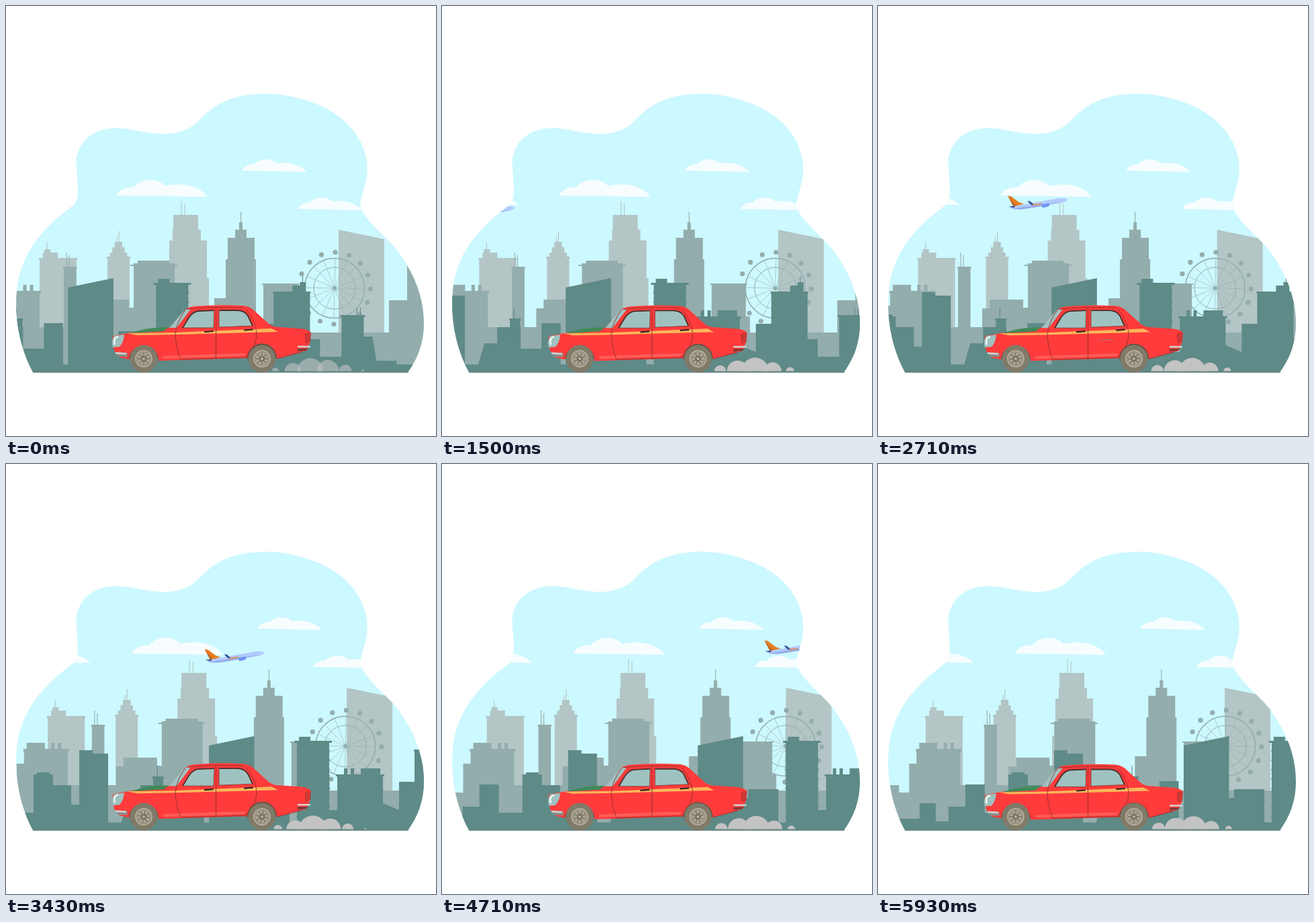
An HTML page that plays this animation: 640 px wide and 640 px high, repeating every 6000 ms.

```html
<!DOCTYPE html>
<html lang="en">
<head>
<meta charset="utf-8">
<title>City drive</title>
<style>
html, body { margin: 0; width: 100%; height: 100%; overflow: hidden; background: #fff; }
svg { display: block; width: 100vw; height: 100vh; }
</style>
</head>
<body>
<svg viewBox="0 0 640 640">
  <defs>
    <clipPath id="blob"><path d="M40 545C20 508 11 460 17 415C25 364 56 329 101 296C110 285 106 268 106 253C104 238 103 224 109 213C120 189 145 180 172 182C206 185 245 202 280 177C292 168 299 152 335 138C385 123 430 133 465 147C505 164 535 196 537.500 238C539 262 530 274 527 297C532 314 550 330 566 346Q585 364 597 386C614 415 622 443 622 473C622 502 612 526 598 545Z"/></clipPath>
    <path id="panes" d="M263 479L272 464Q278 455 286 454L310 453L309 479ZM317 453H344Q355 453 360 461L367 476L317 478Z"/>
    <clipPath id="glass"><use href="#panes"/></clipPath>
    <clipPath id="road"><path d="M380 500H540V543.500H380Z"/></clipPath>
    <path id="puff" d="M0 16C5 8 12 6 18 7C26-3 44-3 52 5C73 2 88 9 97 18Z"/>
    <g id="wheel">
      <circle r="20.500" fill="#807a69"/>
      <circle r="13" fill="#b4ac98"/>
      <circle r="11" fill="#918b7b"/>
      <circle r="9.500" fill="#aaa391"/>
      <path id="spokes" stroke="#716c60" stroke-width="1.300"/>
      <circle r="4" fill="#716c60"/><circle r="2" fill="#bbb4a0"/>
    </g>
  </defs>

  <g clip-path="url(#blob)">
    <rect width="640" height="640" fill="#ccf8ff"/>
    <g id="clouds" fill="#f7fdff">
      <path d="M164 282C169 273 179 269 190 270C198 258 224 253 237 268C262 262 288 267 300 284Z"/>
      <use href="#puff" x="351" y="229"/>
      <use href="#puff" x="434" y="286"/>
      <use href="#puff" x="6" y="278"/>
    </g>
    <path id="far" fill="#b3c5c5"/>
    <g id="ferris" fill="#93adac" stroke="#93adac"></g>
    <path id="mid" fill="#93adac"/>
    <g id="plane">
      <path d="M103 305L130 301L174 293Q184 291 190 294Q191 296 182 299L154 304L122 309Q107 311 103 305Z" fill="#b2cafd"/>
      <path d="M108 308L155 302L184 297L154 304L122 309Z" fill="#91a9e8"/>
      <path d="M101 289L106 290L118 299L125 301L109 305Z" fill="#e47b20"/>
      <path d="M101 289L109 304L112 303Z" fill="#b9662d"/>
      <path d="M130 297L134 297L141 303L136 303ZM102 305L112 304L110 307Z" fill="#36549c"/>
      <path d="M137 302L152 300L150 302L139 304Z" fill="#d88d58"/>
      <path d="M150 302L162 300Q164 303 161 305L153 307Z" fill="#7195ed"/>
    </g>
    <path id="near" fill="#5e8a87"/>
  </g>
  <path d="M40 545H599" stroke="#607f7e" stroke-width="1.600"/>

  <g id="dust" fill="#c3c3c3" clip-path="url(#road)"></g>

  <g id="car">
    <path d="M182 525A23 23 0 0 1 228 525ZM358 525A23 23 0 0 1 404 525Z" fill="#5f5144"/>
    <path d="M159 491L186 486L243 479L264 455Q269 448 280 447Q315 444 353 446Q363 447 369 453L391 473Q397 478 407 478L437 480Q450 481 454 486L453 499L447 513L403 525A22 22 0 0 0 359 524L227 528A22 22 0 0 0 183 526L169 523L161 513L158 499Z" fill="#ff3b3b"/>
    <path d="M243 479L266 452L275 451L254 479Z" fill="#9fc2c0"/>
    <path d="M185 487Q209 478 242 478L235 484Z" fill="#408a58"/>
    <path d="M180 487L250 486L395 480L405 485L255 489L195 490Z" fill="#fbb75b"/>
    <path d="M234 521L312 518L357 517L355 521L234 525Z" fill="#ff5c57"/>
    <use href="#panes" fill="#9fc2c0" stroke="#7e302d" stroke-width=".8"/>
    <path d="M263 479L272 464Q278 455 286 454L310 453M317 453H344Q355 453 360 461L367 476" fill="none" stroke="#4b302c" stroke-width="1.800"/>
    <g clip-path="url(#glass)"><path id="glint" d="M-26 450H-13L-3 481H-10ZM-4 450H12L26 481H8Z" fill="#f4fbfb"/></g>
    <path d="M267 452Q254 470 252 488Q253 511 260 526L357 523Q374 505 373 486Q371 469 357 451M312.500 448V525M404 525L440 515M270 451Q310 447 354 449" fill="none" stroke="#8f302c" stroke-width=".9"/>
    <path d="M296 485L308 484M355 482.500L367 481.500" stroke="#302826" stroke-width="2.200" stroke-linecap="round"/>
    <path d="M161 491L176 489Q175 501 169 507L159 508Q156 499 161 491Z" fill="#9fc2c0"/>
    <path d="M162 504Q159 494 167 492" fill="none" stroke="#fff" stroke-width="2"/>
    <path d="M161 515L180 516L181 522L167 522Z" fill="#8b8d88"/>
    <path d="M163 516.500L179 517.500M434 507H453" stroke="#d1d3cf" stroke-width="2.500"/>
    <path d="M445 488L453 486V499L446 502Z" fill="#b52e2d"/>
    <path d="M448 488V500M451 487V499" stroke="#ff5148"/>
    <path d="M434 510H450L446 513L434 514Z" fill="#783b39"/>
  </g>
  <g id="front"><use href="#wheel"/></g>
  <g id="rear"><use href="#wheel"/></g>
  <path id="streak" d="M328 496.500H350" stroke="#8f8782" stroke-width=".8"/>
</svg>
<script>
const NS = 'http://www.w3.org/2000/svg';
const GROUND = 545;
const $ = id => document.getElementById(id);

function add(parent, tag, attrs) {
  const el = document.createElementNS(NS, tag);
  for (const key in attrs) el.setAttribute(key, attrs[key]);
  return parent.appendChild(el);
}

// Collects the buildings of one layer into a single path.
class City {
  d = '';

  block(x, w, top, h = GROUND - top) {
    this.d += `M${x} ${top}h${w}v${h}h${-w}Z`;
    return this;
  }
  capped(x, w, top, overhang = 2) {
    return this.block(x, w, top).block(x - overhang, w + 2 * overhang, top, 3);
  }
  mast(x, top, base) {
    return this.block(x - .5, 1.1, top, base - top);
  }
  chimneys(x, top) {
    return this.block(x, 5, top, 11).block(x + 10, 5, top, 11);
  }
  // Tiers that narrow evenly towards the top.
  spire(center, width, top, tiers) {
    for (let i = 0; i < tiers; i++) {
      const w = width * (1 - .22 * i);
      this.block(center - w / 2, w, top - 8 * i);
    }
    return this;
  }
  // Low houses: each [x, top] lasts up to the next x.
  row(end, ...points) {
    points.forEach(([x, top], i) => this.block(x, (points[i + 1] || [end])[0] - x, top));
    return this;
  }
  shape(d) {
    this.d += d;
    return this;
  }
  show(id) {
    $(id).setAttribute('d', this.d);
  }
}

new City()
  .capped(50, 55, 375, 1).block(55, 22, 367).block(57, 9, 362).mast(61, 352, 362)
  .spire(167.5, 33, 375, 4).block(150, 35, 373, 3).mast(168, 335, 352).mast(165, 344, 352)
  .block(238, 64, 405).block(243, 56, 349).block(248, 42, 333).block(249, 37, 311)
  .mast(261, 291, 311).mast(266, 294, 311)
  .shape('M495 333L563 347V500H495Z')
  .show('far');

new City()
  .row(50, [-100, 478], [-41, 489], [-26, 446], [-15, 425])
  .block(-16, 68, 424, 4).block(-11, 27, 415).chimneys(25.5, 415)
  .row(191, [50, 478], [122, 450], [133, 437], [183, 449])
  .capped(86, 18.5, 388, 1).mast(90, 367, 388).mast(94, 371, 388)
  .block(190, 61, 383).block(185, 70, 385, 2).block(196, 47, 379)
  .row(660, [250, 486], [310, 435], [327, 377], [372, 486], [383, 414], [434, 462], [440, 486], [570, 438], [597, 380])
  .block(381, 55, 413, 2)
  .block(330, 40, 345).block(341, 17, 333).block(347, 5, 322).mast(349.5, 306, 322)
  .show('mid');

// The long slanted block carries evenly spaced vents on its roof.
let slanted = 'M92 419L159.5 405V545H92Z';
for (let x = 108; x < 159; x += 15) slanted += `M${x} ${438.5 - .21 * x}h4.5v8h-4.5Z`;

const near = new City()
  .row(640, [-400, 533.5])
  .row(-58, [-400, 528], [-301, 505], [-277, 532], [-258, 510], [-233, 477], [-204, 519], [-169, 462], [-140, 478], [-113, 507], [-101, 431])
  .block(-164, 19, 459).block(-101, 20, 426)
  .row(84.5, [-10, 478], [25, 510], [56, 472])
  .capped(9, 15, 465, 1).mast(15, 449, 465)
  .shape('M-38 533L-29 502H-9V545H-38Z' + slanted)
  .row(212, [159, 497], [167, 484])
  .capped(223, 48, 412, 4).block(226, 17, 406)
  .capped(283, 68, 462).block(318, 29, 453).chimneys(293, 453)
  .row(398, [271, 515], [375, 473]).shape('M351 505L375 515V545H351Z')
  .capped(398, 54, 425, 1).block(426, 20, 416).block(437, 9, 411).mast(441, 402, 411)
  .row(499, [452, 496], [467, 522])
  .capped(499, 33, 460).mast(522, 449, 460).mast(527, 449, 460)
  .shape('M532 492H545L551 528H581V545H532Z');
for (let y = 426; y < 534; y += 14) near.block(222, 50.5, y, 1.5);
near.show('near');

// Big wheel, drawn around its hub.
const rim = (radius, angle) => [radius * Math.sin(angle), -radius * Math.cos(angle)];
const ferris = $('ferris');
for (const r of [44.5, 31])
  add(ferris, 'circle', { r, fill: 'none', 'stroke-width': r / 32 });
for (let i = 0; i < 16; i++) {
  const angle = i * Math.PI / 8 + .02;
  const [cx, cy] = rim(53.5, angle);
  add(ferris, 'circle', { cx, cy, r: 3.6, stroke: 'none' });
  add(ferris, 'path', { d: `M0 0L${rim(45, angle)}`, 'stroke-width': .6 });
}
add(ferris, 'circle', { r: 2.5 });

$('spokes').setAttribute('d',
  Array.from({ length: 8 }, (_, i) => `M0 0L${rim(9, i * Math.PI / 4)}`).join(''));

const puffs = Array.from({ length: 6 }, () => add($('dust'), 'circle', { cy: 543.5 }));
const move = (id, x, y = 0, extra = '') =>
  $(id).setAttribute('transform', `translate(${x} ${y}) ${extra}`);

function draw(ms) {
  const t = Math.floor(ms / 6000 * 84 + .1) / 14;
  move('clouds', 6.65 * t);
  move('far', 3.55 * t);
  move('ferris', 489 + 4.75 * t, 420);
  move('mid', 12.2 * t);
  move('near', .4 + 61.15 * t);
  move('plane', 143.3 * (t - 2.07), -10 * (t - 2.07));

  move('car', 0, .75 * (1 - Math.cos(2 * Math.PI * t / .7)));
  move('glint', 318 + 200 * ((t - .5) % 3.14 - 1.57));
  const spin = `rotate(${-167 * t})`;
  move('front', 205, 525, spin);
  move('rear', 381, 525, spin);

  // Puffs drift back, swelling up to the middle of the trail.
  puffs.forEach((puff, i) => {
    const x = 401 + 26 * i + 130 * t % 26;
    puff.setAttribute('cx', x);
    puff.setAttribute('r', Math.max(0, 21.5 - .27 * Math.abs(x - 461)));
    puff.setAttribute('opacity', Math.min(1, .6 + .4 * t));
  });

  const phase = t % 2.5;
  $('streak').setAttribute('opacity', phase > .14 && phase < .3 ? 1 : 0);
}

const begin = performance.now();
function tick() {
  draw((performance.now() - begin) % 6000);
  requestAnimationFrame(tick);
}
tick();
</script>
</body>
</html>
```
